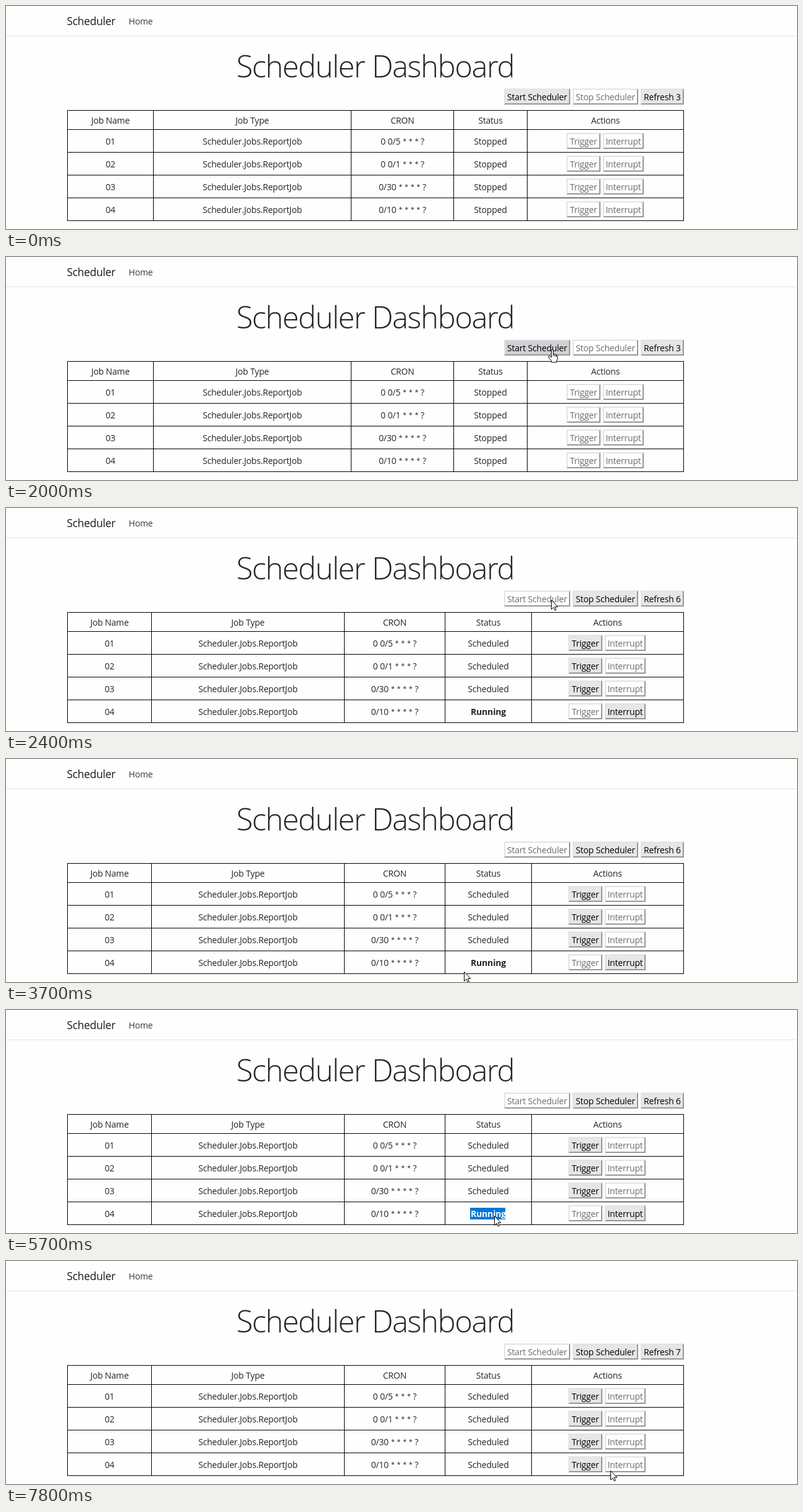
These frames come from a looping animation (1280 px wide and 362 px high, 8 s). An HTML page:

```html
<!DOCTYPE html>
<html lang="en">
<head>
<meta charset="utf-8">
<title>Scheduler Dashboard</title>
<style>
html, body { margin: 0; width: 100%; height: 100%; overflow: hidden; background: #fefefe; }
svg { display: block; }
text {
  font: 14px "Open Sans", "Noto Sans", sans-serif;
  letter-spacing: -.18px;
  fill: #212529;
  text-anchor: middle;
  white-space: pre;
}
.brand { font-size: 17.4px; letter-spacing: -.25px; fill: #1a1a1a; text-anchor: start; }
.home { fill: #343a40; text-anchor: start; }
.title { font-size: 49px; font-weight: 300; letter-spacing: -1.44px; }
.cron { word-spacing: .3px; }
.star { font-size: 11px; baseline-shift: 2px; }
.bold { font-weight: 700; }
.on { fill: #000; }
.off { fill: #6d6d6d; }
.white { fill: #fff; }
.grid { fill: none; stroke: #000; }
.face { fill: #e6e6e9; }
.off-face { fill: #fefefe; }
.light { fill: #e3e3e3; }
.dark { fill: #979797; }

#stopped, #running, #idle, #select, #cursor, #hand, #start .face, #arrow {
  animation: 8s step-end infinite;
}
#stopped { animation-name: stopped; }
#running { animation-name: running; }
#idle { animation-name: idle; }
#select { animation-name: select; }
#start .face { animation-name: hover; }
#cursor { animation-name: move, blink; }
#hand { animation-name: hand; }
#arrow { animation-name: arrow; }

@keyframes stopped { 0% { opacity: 1 } 27.5%, 100% { opacity: 0 } }
@keyframes running { 0% { opacity: 0 } 27.5% { opacity: 1 } 90%, 100% { opacity: 0 } }
@keyframes idle { 0% { opacity: 0 } 90%, 100% { opacity: 1 } }
@keyframes select { 0% { opacity: 0 } 70%, 100% { opacity: 1 } }
@keyframes hover { 0% { fill: #e6e6e9 } 12.5%, 100% { fill: #d0d0d7 } }
@keyframes hand { 0% { opacity: 0 } 12.5% { opacity: 1 } 28.75%, 100% { opacity: 0 } }
@keyframes arrow { 0% { opacity: 1 } 12.5% { opacity: 0 } 28.75%, 100% { opacity: 1 } }
@keyframes blink {
  0% { opacity: 0 } 5% { opacity: 1 }
  41.25% { opacity: 0 } 46.25% { opacity: 1 }
  60% { opacity: 0 } 61.25%, 100% { opacity: 1 }
}
@keyframes move {
  0%, 5% { transform: translate(76px, 5px) }
  6.25% { transform: translate(210px, 90px) }
  7.5% { transform: translate(420px, 210px) }
  8.75% { transform: translate(640px, 290px) }
  10% { transform: translate(800px, 280px) }
  11.25% { transform: translate(880px, 205px) }
  12.5% { transform: translate(904px, 157px) }
  15% { transform: translate(895px, 155px) }
  16.25% { transform: translate(886px, 153px) }
  18.75% { transform: translate(895px, 156px) }
  20% { transform: translate(902px, 158px) }
  22.5% { transform: translate(897px, 156px) }
  23.75% { transform: translate(890px, 153px) }
  25% { transform: translate(884px, 150px) }
  28.75% { transform: translate(882px, 149px) }
  38.75% { transform: translate(830px, 235px) }
  40% { transform: translate(716px, 325px) }
  46.25% { transform: translate(741px, 345px) }
  47.5% { transform: translate(753px, 341px) }
  50% { transform: translate(762px, 340px) }
  52.5% { transform: translate(785px, 341px) }
  53.75% { transform: translate(800px, 340px) }
  55% { transform: translate(815px, 338px) }
  56.25% { transform: translate(825px, 335px) }
  57.5% { transform: translate(812px, 331px) }
  58.75% { transform: translate(797px, 328px) }
  61.25% { transform: translate(719px, 322px) }
  63.75% { transform: translate(724px, 323px) }
  66.25% { transform: translate(741px, 326px) }
  68.75% { transform: translate(763px, 330px) }
  70% { transform: translate(790px, 334px) }
  72.5% { transform: translate(811px, 337px) }
  85% { transform: translate(812px, 336px) }
  87.5% { transform: translate(867px, 331px) }
  88.75% { transform: translate(900px, 332px) }
  90% { transform: translate(930px, 333px) }
  91.25% { transform: translate(955px, 334px) }
  93.75% { transform: translate(975px, 338px) }
  95% { transform: translate(1000px, 342px) }
  96.25% { transform: translate(992px, 342px) }
  97.5%, 100% { transform: translate(978px, 340px) }
}
</style>
</head>
<body>
<svg width="1280" height="362" viewBox="0 0 1280 362">
  <rect y="48" width="1280" height="1" fill="#e2e3e5"/>
  <text class="brand" x="98.5" y="31">Scheduler</text>
  <text class="home" x="198.6" y="30">Home</text>
  <text class="title" x="597.5" y="116">Scheduler Dashboard</text>
  <g id="stopped"></g>
  <g id="running"></g>
  <g id="idle"></g>
  <g id="cursor" fill="#fff" stroke="#000" stroke-linejoin="round">
    <path id="arrow" d="M.5 .5V15.5L4 12.3L6.2 17.2L8.4 16.2L6.2 11.5H10.8Z"/>
    <g id="hand">
      <path d="M-1.5 13V2Q-1.5 .4 0 .4T1.5 2V7.5Q3.5 6.6 4 8.2Q6 7.6 6.4 9.2Q8.3 9 8.3 11V15.5L7 18.5V21H-1.5V18.5L-6.2 12.6Q-6.6 10.3-4.3 10.5Z"/>
      <path d="M1.5 7.5V11M4 8.2V11.5M6.4 9.2V12" fill="none"/>
    </g>
  </g>
</svg>
<script>
const heads = ["Job Name", "Job Type", "CRON", "Status", "Actions"];
const crons = ["0 0/5 * * * ?", "0 0/1 * * * ?", "0/30 * * * * ?", "0/10 * * * * ?"];
const wide = [99.5, 238.5, 558.5, 724.5, 843.5, 1096.5];
const narrow = [99.5, 235.5, 547.5, 710.5, 850.5, 1096.5];

const text = (x, y, s, cls = "") => `<text x="${x}" y="${y}" class="${cls}">${s}</text>`;
const stars = s => s.replace(/\*/g, '<tspan class="star">*</tspan>');

function button(x, y, w, label, on, id = "") {
  const h = 26, r = x + w, b = y + h;
  return `<g id="${id}">
    <rect class="${on ? "face" : "off-face"}" x="${x}" y="${y}" width="${w}" height="${h}"/>
    <path class="light" d="M${x} ${b}V${y}H${r}l-2 2H${x + 2}V${b - 2}Z"/>
    <path class="dark" d="M${x} ${b}H${r}V${y}l-2 2V${b - 2}H${x + 2}Z"/>
    ${text(x + w / 2, y + 19, label, on ? "on" : "off")}</g>`;
}

function grid(cols) {
  const rows = [169.5, ...[0, 1, 2, 3, 4].map(i => 200.5 + 37 * i)];
  return `<path class="grid" d="${rows.map(y => `M99 ${y}H1097`).join("")}${cols.map(x => `M${x} 169V349`).join("")}"/>`;
}

function scene(id, cols, count, status) {
  const mid = heads.map((_, i) => (cols[i] + cols[i + 1]) / 2);
  const live = id !== "stopped";
  const bx = Math.floor(mid[4] - 63);
  let out = button(806, 134, 107, "Start Scheduler", !live, live ? "" : "start")
    + button(917, 134, 106, "Stop Scheduler", live)
    + button(1027, 134, 70, "Refresh " + count, true)
    + grid(cols)
    + heads.map((h, i) => text(mid[i], 191, h)).join("");
  crons.forEach((cron, i) => {
    const y = 225 + 37 * i, busy = status[i] === "Running";
    out += text(mid[0], y, "0" + (i + 1))
      + text(mid[1], y, "Scheduler.Jobs.ReportJob")
      + text(mid[2], y, stars(cron), "cron")
      + text(mid[3], y, status[i], busy ? "bold" : "")
      + button(bx, y - 19, 55, "Trigger", live && !busy)
      + button(bx + 59, y - 19, 66, "Interrupt", busy);
    if (busy) out += `<g id="select"><rect x="751" y="321" width="57" height="19" fill="#0078d7"/>
      ${text(mid[3], y, "Running", "bold white")}</g>`;
  });
  document.getElementById(id).innerHTML = out;
}

const all = s => Array(4).fill(s);
scene("stopped", wide, 3, all("Stopped"));
scene("running", narrow, 6, [...all("Scheduled").slice(1), "Running"]);
scene("idle", narrow, 7, all("Scheduled"));
</script>
</body>
</html>
```
